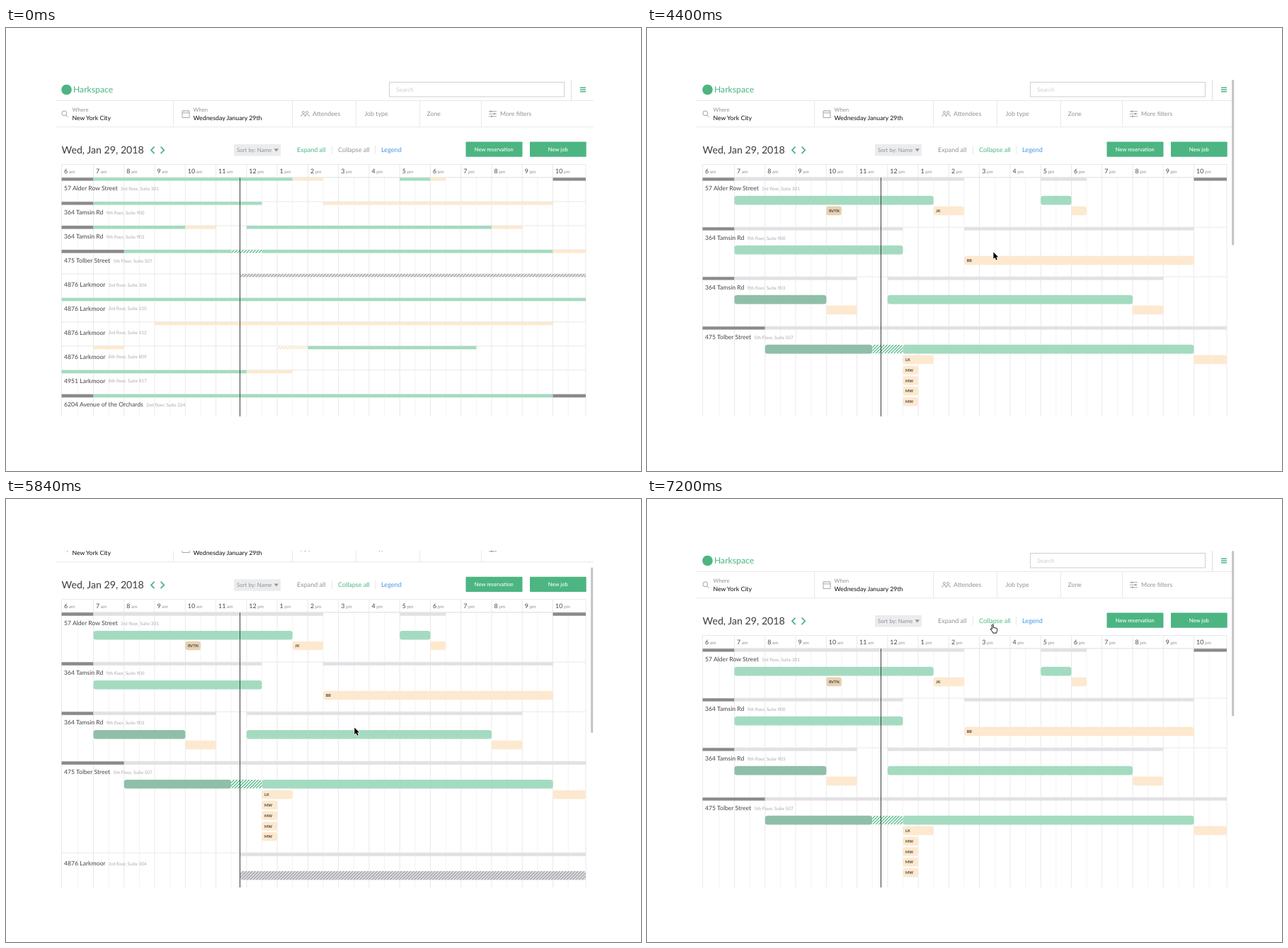
These frames come from a looping animation (897 by 625 pixels, 8000 ms). An HTML page with a canvas:

```html
<!DOCTYPE html>
<html lang="en">
<head>
<meta charset="utf-8">
<title>Room schedule</title>
<style>
  html, body { margin: 0; width: 100%; height: 100%; overflow: hidden; background: #fff; }
  canvas { display: block; }
</style>
</head>
<body>
<canvas id="stage" width="897" height="625"></canvas>
<script>
const ctx = document.getElementById('stage').getContext('2d');
const LOOP = 8000, STEP = 80, EXPAND_AT = 2480, MAX_SCROLL = 53;
const GREEN = '#4cb582', GRAY = '#929297', LINE = '#e8e8ea';
const VIEW = { x: 70, y: 73, w: 760, h: 475 };
const GRID = { left: 78.5, right: 819, top: 192.5, body: 211.2 };

// kind: strip colour, pill colour, lane, stripe colour
const KINDS = {
  B: { strip: '#8b898c' },
  G: { strip: '#a4dbc0', pill: '#a4dbc0', lane: 0 },
  D: { strip: '#a4dbc0', pill: '#8fbfa8', lane: 0 },
  P: { strip: '#fde9cf', pill: '#fde9cf', lane: 1 },
  T: { pill: '#e6d2b4' },
  H: { strip: '#fff', pill: '#fff', lane: 0, stripe: '#52b987' },
  N: { strip: '#fff', pill: '#fff', lane: 1, stripe: '#fbdcb4' },
  X: { strip: '#e4e4e7', pill: '#e2e2e6', lane: 0, stripe: '#a3a2a7' }
};

// Blocks: kind, start hour, end hour, label, own lane (pill only)
const rows = [
  [70, '57 Alder Row Street', '3rd floor, Suite 301',
    'B 6 7|G 7 13.5|T 10 10.5 RVTN 1|P 13.5 14.5 JK|G 17 18|P 18 18.5|B 22 23'],
  [70, '364 Tamsin Rd', '9th floor, Suite 900', 'B 6 7|G 7 12.5|P 14.5 22 BB'],
  [70, '364 Tamsin Rd', '9th floor, Suite 903', 'B 6 7|D 7 10|P 10 11|G 12 20|P 20 21'],
  [129, '475 Tolber Street', '5th Floor, Suite 507',
    'B 6 8|D 8 11.5|H 11.5 12.5|G 12.5 22|P 12.5 13.5 LK 1|P 12.5 13 MW 2|' +
    'P 12.5 13 MW 3|P 12.5 13 MW 4|P 12.5 13 MW 5|P 22 23'],
  [70, '4876 Larkmoor', '3rd floor, Suite 304', 'X 11.8 23'],
  [70, '4876 Larkmoor', '3rd floor, Suite 310', 'G 6 23'],
  [70, '4876 Larkmoor', '3rd floor, Suite 312', 'P 9 22'],
  [70, '4876 Larkmoor', '8th floor, Suite 809', 'P 7 8|N 13 14|G 14 19.5'],
  [70, '4951 Larkmoor', '8th floor, Suite 817', 'G 6 12|P 12 13.5'],
  [70, '6204 Avenue of the Orchards', '2nd floor, Suite 224', 'B 6 7|G 7 22|B 22 23']
].map(([height, name, suite, list]) => ({
  height, name, suite,
  blocks: list.split('|').map(item => {
    const [kind, from, to, label, lane] = item.split(' ');
    return { ...KINDS[kind], from: +from, to: +to, label, ...(lane && { lane: +lane, extra: true }) };
  })
}));

// Pointer stops: time, x, y
const path = [
  [480, 545, 500], [800, 468, 238], [880, 468, 238], [1360, 443.7, 173.3], [3200, 443.7, 173.3],
  [3280, 428, 173.3], [3360, 425, 172.5], [3840, 425, 172.5], [4480, 492.3, 322.6],
  [6560, 492.3, 322.6], [7200, 488.3, 176.5]
];

const clamp = v => Math.max(0, Math.min(1, v));
const smooth = u => u * u * (3 - 2 * u);
const hourX = h => h <= 6 ? GRID.left : h >= 23 ? GRID.right : 123.5 + 43.27 * (h - 7);

function pointer(t) {
  if (t < path[0][0]) return null;
  const next = path.findIndex(p => p[0] > t);
  if (next < 0) return path[path.length - 1].slice(1);
  const [a, b] = [path[next - 1], path[next]];
  const u = smooth((t - a[0]) / (b[0] - a[0]));
  return [a[1] + (b[1] - a[1]) * u, a[2] + (b[2] - a[2]) * u];
}

function scrollAt(t) {
  if (t < 4700) return 0;
  if (t < 5800) return MAX_SCROLL * (1 - Math.exp(-(Math.min(t, 5280) - 4692) / 120));
  return MAX_SCROLL * (1 - clamp((t - 5790) / 530) ** 1.36);
}

function text(s, x, y, size, color, weight = 400, align = 'left') {
  ctx.font = `${weight} ${size}px Lato, "Open Sans", sans-serif`;
  ctx.textRendering = 'geometricPrecision';
  ctx.textAlign = align;
  ctx.fillStyle = color;
  ctx.fillText(s, x, y);
  return x + ctx.measureText(s).width;
}

function line(color, width, ...pts) {
  ctx.beginPath();
  for (let i = 0; i < pts.length; i += 2) ctx.lineTo(pts[i], pts[i + 1]);
  ctx.strokeStyle = color;
  ctx.lineWidth = width;
  ctx.stroke();
}

function box(color, x, y, w, h, r = 0) {
  ctx.beginPath();
  ctx.roundRect(x, y, w, h, r);
  ctx.fillStyle = color;
  ctx.fill();
}

function ring(x, y, r, color, width = 0.9, from = 0, to = 7) {
  ctx.beginPath();
  ctx.arc(x, y, r, from, to);
  ctx.strokeStyle = color;
  ctx.lineWidth = width;
  ctx.stroke();
}

function bar(color, stripe, x, y, w, h, r) {
  box(color, x, y, w, h, r);
  if (!stripe) return;
  ctx.save();
  ctx.clip();
  for (let sx = x - h; sx < x + w; sx += 4.3) line(stripe, 1.3, sx, y + h, sx + h, y);
  ctx.restore();
}

function drawHeader() {
  ctx.beginPath();
  ctx.arc(85.5, 87, 7.3, 0, 7);
  ctx.fillStyle = GREEN;
  ctx.fill();
  text('Harkspace', 95, 91.3, 12.2, GREEN);

  ctx.strokeStyle = '#cfcfd2';
  ctx.lineWidth = 1;
  ctx.strokeRect(541.5, 76.5, 247, 20.5);
  text('Search', 551, 89.8, 8.4, '#cfcfd2');
  line('#dedee0', 1, 798.5, 73, 798.5, 102);
  for (const y of [84.2, 87, 89.8]) line(GREEN, 1.5, 811, y, 819, y);

  line(LINE, 1, 70, 102.5, 830, 102.5);
  line(LINE, 1, 70, 139.7, 830, 139.7);
  for (const x of [236.5, 404.5, 494.5, 584.5, 671.5]) line(LINE, 1, x, 103, x, 139.5);

  ring(82.3, 120.3, 3.4, GRAY);
  line(GRAY, 0.9, 84.7, 122.8, 87.5, 125.7);
  text('Where', 93.5, 117.8, 7.7, GRAY);
  text('New York City', 93.5, 129.6, 8.7, '#222', 500);

  ctx.strokeStyle = GRAY;
  ctx.lineWidth = 0.8;
  ctx.strokeRect(249, 117, 10, 9.5);
  line(GRAY, 0.8, 249, 119.8, 259, 119.8);
  line(GRAY, 0.8, 251.5, 115.7, 251.5, 117);
  line(GRAY, 0.8, 256.5, 115.7, 256.5, 117);
  text('When', 264.5, 117.8, 7.7, GRAY);
  text('Wednesday January 29th', 264.5, 129.6, 8.75, '#222', 500);

  for (const x of [420, 425.3]) {
    ring(x, 119, 1.6, GRAY, 0.8);
    ring(x, 125, 3.2, GRAY, 0.8, Math.PI, Math.PI * 2);
  }
  text('Attendees', 433, 124.3, 8.8, GRAY);
  text('Job type', 506.5, 124.3, 8.9, GRAY);
  text('Zone', 594.5, 124.3, 8.7, GRAY);
  [[117.7, 685], [121.2, 690], [124.7, 686]].forEach(([y, knob]) => {
    line(GRAY, 0.8, 682, y, 693, y);
    line(GRAY, 1.8, knob - 1, y, knob + 1, y);
  });
  text('More filters', 698, 124.3, 8.7, GRAY);
}

function drawToolbar(expanded) {
  text('Wed, Jan 29, 2018', 78.5, 177.2, 14.2, '#3c3c40');
  line(GREEN, 1.8, 209.6, 167.5, 205, 172.3, 209.6, 177.1);
  line(GREEN, 1.8, 218.6, 167.5, 223.2, 172.3, 218.6, 177.1);

  box('#ebecee', 322, 164, 66, 16.5, 1);
  text('Sort by: Name', 326, 175, 7.9, GRAY);
  ctx.beginPath();
  ctx.moveTo(378.7, 170.3);
  ctx.lineTo(384.9, 170.3);
  ctx.lineTo(381.8, 174.4);
  ctx.fillStyle = GRAY;
  ctx.fill();

  text('Expand all', 411, 175.2, 9, expanded ? GRAY : GREEN);
  text('Collapse all', 469, 175.2, 9, expanded ? GREEN : GRAY);
  text('Legend', 530, 175.2, 9.1, '#3f97ea');
  line(LINE, 1, 460.5, 166, 460.5, 178);
  line(LINE, 1, 521.5, 166, 521.5, 178);

  box(GREEN, 649.5, 160.5, 80, 21.3, 1);
  box(GREEN, 740, 160.5, 79.7, 21.3, 1);
  text('New reservation', 689.3, 173.6, 7.6, '#fff', 500, 'center');
  text('New job', 779.8, 173.6, 7.6, '#fff', 500, 'center');
}

function drawRow(row, top, expanded) {
  line(LINE, 1, GRID.left, top - 0.2, GRID.right, top - 0.2);
  for (const b of row.blocks) {
    const x = hourX(b.from), w = hourX(b.to) - x;
    if (!b.extra) {
      const plain = expanded && b.pill;
      bar(plain ? '#e1e1e5' : b.strip, plain ? null : b.stripe, x, top, w, 4.4, 0);
    }
    if (!expanded || !b.pill) continue;
    const y = top + 25.6 + 14.8 * b.lane;
    bar(b.pill, b.stripe, x, y, w, 12.6, 3.5);
    if (b.label) text(b.label, x + 3.6, y + 8.4, 5.5, '#4a4238', 700);
  }
  const end = text(row.name, 82, top + 17.7, 8.65, '#45454a');
  text(row.suite, end + 4.3, top + 17.5, 6.35, '#a9a9ae');
}

function drawGrid(expanded) {
  const bottom = 640;
  line(LINE, 1, GRID.left, GRID.top, GRID.right, GRID.top);
  line(LINE, 1, GRID.left, GRID.body - 0.7, GRID.right, GRID.body - 0.7);
  for (let h = 6; h <= 23; h++) {
    const x = hourX(h);
    line(LINE, 1, x, GRID.top, x, bottom);
    if (h === 23) break;
    const half = 123.5 + 43.27 * (h - 6.5);
    line('#f3f3f4', 1, half, GRID.body, half, bottom);
    const end = text(h > 12 ? h - 12 : h, x + 3.5, 205.2, 8.9, '#45454a');
    text(h < 12 ? 'am' : 'pm', end + 1.6, 205.2, 6.4, GRAY);
  }
  let top = GRID.body;
  for (const row of rows) {
    drawRow(row, top, expanded);
    top += expanded ? row.height : 33.95;
  }
  line('#3a3a3c', 1, 330.5, GRID.body, 330.5, bottom);
}

function drawScrollbar(t, offset, expanded) {
  ctx.globalAlpha = clamp((t - 1840) / 320);
  box('#c3c3c5', 826.2, VIEW.y + offset * 0.46, 3, expanded ? 233.5 : 331, 1.5);
  ctx.globalAlpha = 1;
}

const ARROW = new Path2D('M0 0V9.6L2.2 7.6L3.7 11.2L5.4 10.5L3.9 7H6.8Z');
const HAND = new Path2D('M-1 1Q0-.6 1 1V5.2Q2 4.3 2.8 5.4Q3.8 4.7 4.6 5.8Q6.4 5.2 6.4 7' +
  'V9Q6.2 10.5 5.4 11.4V12.6H.4V11.6L-3 7.6Q-3.2 6-1.8 6.6L-1 7.4Z');

function drawPointer(t) {
  const at = pointer(t);
  if (!at) return;
  const hand = t > 6560 && at[1] < 182;
  ctx.save();
  ctx.translate(...at);
  ctx.lineJoin = 'round';
  ctx.lineWidth = hand ? 1 : 1.4;
  ctx.strokeStyle = hand ? '#111' : '#fff';
  ctx.fillStyle = hand ? '#fff' : '#000';
  if (hand) ctx.fill(HAND);
  ctx.stroke(hand ? HAND : ARROW);
  if (!hand) ctx.fill(ARROW);
  ctx.restore();
}

function draw(now) {
  const t = Math.floor(((now + 1) % LOOP) / STEP) * STEP;
  const expanded = t >= EXPAND_AT;
  const offset = scrollAt(t);
  ctx.fillStyle = '#fff';
  ctx.fillRect(0, 0, 897, 625);
  ctx.save();
  ctx.beginPath();
  ctx.rect(VIEW.x, VIEW.y, VIEW.w, VIEW.h);
  ctx.clip();
  ctx.translate(0, -offset);
  drawHeader();
  drawToolbar(expanded);
  drawGrid(expanded);
  ctx.restore();
  drawScrollbar(t, offset, expanded);
  drawPointer(t);
  requestAnimationFrame(draw);
}
requestAnimationFrame(draw);
</script>
</body>
</html>
```
